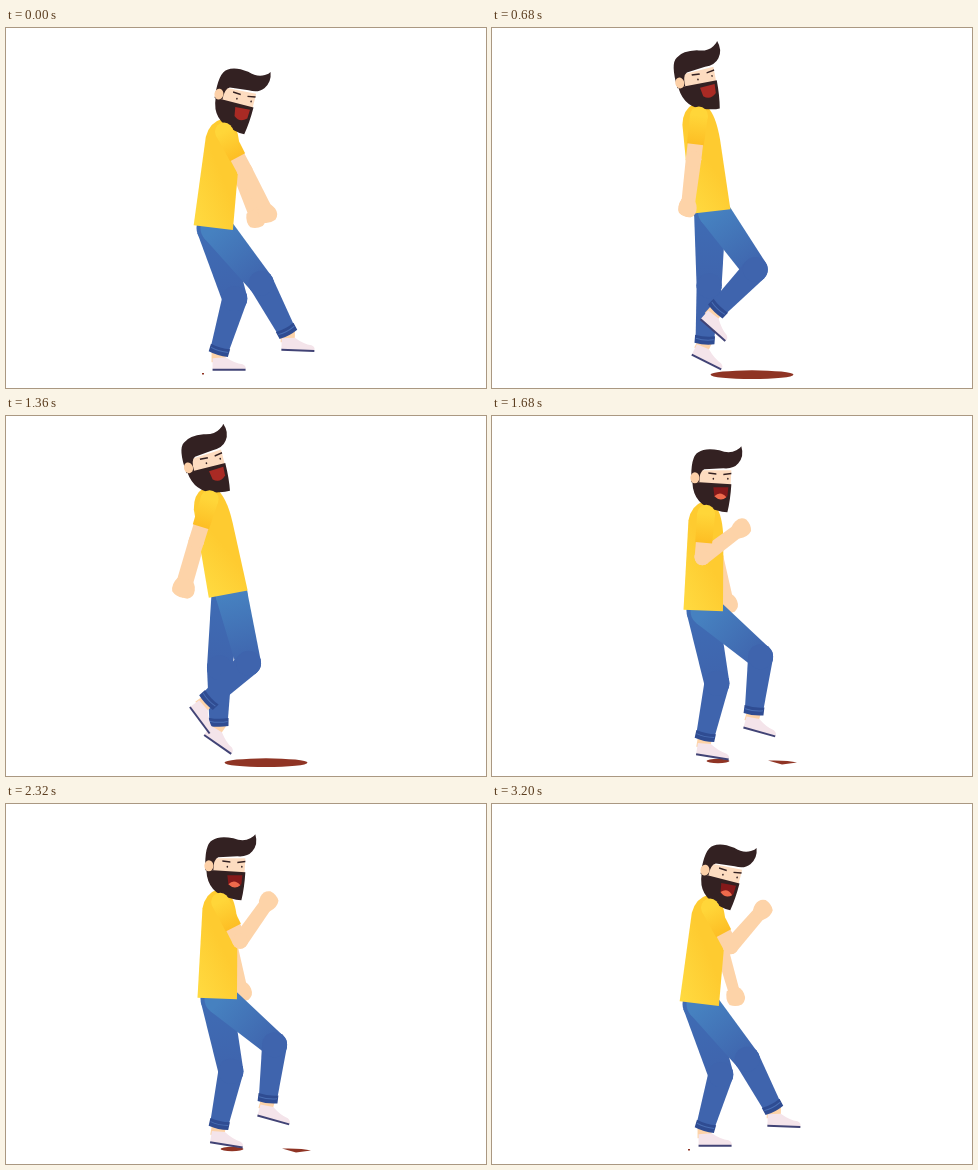
These frames come from a looping animation (480x360 px, 3.24 s). An HTML page with a canvas:

```html
<!DOCTYPE html>
<html lang="en">
<head>
<meta charset="utf-8">
<title>Dancing man</title>
<style>
html, body { margin: 0; width: 100%; height: 100%; overflow: hidden; background: #fff; }
canvas { display: block; width: 480px; height: 360px; }
</style>
</head>
<body>
<canvas id="stage" width="480" height="360"></canvas>
<script>
const ctx = document.getElementById('stage').getContext('2d');
const STEP = 40, STEPS = 81;
const SKIN = '#fdd3a8', HAIR = '#332122', JEANS = '#3f64ad', CUFF = '#2f4c92';

const rad = deg => deg * Math.PI / 180;
const mix = (a, b, u) => a + (b - a) * u;
const clamp = u => Math.max(0, Math.min(1, u));
const smooth = u => u * u * (3 - 2 * u);
const easeCubic = u => u < .5 ? 4 * u ** 3 : 1 - 4 * (1 - u) ** 3;

// Limb angles are measured from straight down, positive to the right.
const reach = (p, deg, len) => ({
  x: p.x + Math.sin(rad(deg)) * len,
  y: p.y + Math.cos(rad(deg)) * len
});

function shape(path, fill) {
  ctx.fillStyle = fill;
  ctx.fill(new Path2D(path));
}

function oval(x, y, rx, ry, fill) {
  ctx.fillStyle = fill;
  ctx.beginPath();
  ctx.ellipse(x, y, rx, ry, 0, 0, Math.PI * 2);
  ctx.fill();
}

function placed(p, deg, draw) {
  ctx.save();
  ctx.translate(p.x, p.y);
  ctx.rotate(rad(deg));
  draw();
  ctx.restore();
}

function blend(a, b, from, to) {
  const g = ctx.createLinearGradient(a.x, a.y, b.x, b.y);
  g.addColorStop(0, from);
  g.addColorStop(1, to);
  return g;
}

// Tapered bar between two joints; the end stays flat unless round is set.
function limb(a, b, wa, wb, fill, round = true) {
  const d = Math.atan2(b.y - a.y, b.x - a.x);
  const nx = -Math.sin(d) / 2, ny = Math.cos(d) / 2;
  ctx.fillStyle = fill;
  ctx.beginPath();
  ctx.moveTo(a.x + nx * wa, a.y + ny * wa);
  ctx.lineTo(b.x + nx * wb, b.y + ny * wb);
  ctx.lineTo(b.x - nx * wb, b.y - ny * wb);
  ctx.lineTo(a.x - nx * wa, a.y - ny * wa);
  ctx.fill();
  oval(a.x, a.y, wa / 2, wa / 2, fill);
  if (round) oval(b.x, b.y, wb / 2, wb / 2, fill);
}

function leg(hip, thigh, shin, foot, thighLen, topTone) {
  const knee = reach(hip, thigh, thighLen);
  const ankle = reach(knee, shin, 57);
  placed(ankle, foot, () => {
    shape('M-7-3H7V9H-7Z', SKIN);
    shape('M-6 5L7 4Q16 10 24 11Q28 13 27 16H-6Z', '#f4e4ea');
    shape('M-6 15.5H27V17.5H-6Z', '#414375');
  });
  limb(hip, knee, 32, 25, blend(hip, knee, topTone, JEANS));
  limb(knee, ankle, 25, 18, JEANS, false);
  placed(ankle, -shin, () => {
    shape('M-10-7Q0-5 10-7V1Q0 3-10 1Z', CUFF);
    shape('M-9-4Q0-2 9-4V-3Q0-1-9-3Z', '#4a6fb4');
  });
}

function arm(shoulder, upper, fore, width) {
  const elbow = reach(shoulder, upper, 44);
  const hand = reach(elbow, fore, 49);
  limb(shoulder, elbow, width, width, SKIN);
  limb(elbow, hand, width, width - 2, SKIN);
  placed(hand, -fore, () => shape('M-7-8Q-11 0-8 6Q-3 10 4 9Q10 6 9-1Q8-8 3-10Z', SKIN));
}

function sleeve(shoulder, upper) {
  const end = reach(shoulder, upper, 29);
  limb(shoulder, end, 18, 17, blend(shoulder, end, '#ffd639', '#fdbe24'), false);
}

function torso() {
  shape('M-20-.5L-17.5-90Q-15-105-4-109L9-105Q17-96 18-70L19.5 0Z',
    blend({ x: -18, y: 0 }, { x: 20, y: -20 }, '#ffda40', '#fecb30'));
}

function head(tongue) {
  shape('M-9-36H26L25-18H-9Z', '#fddcc0');
  shape('M-13-24Q-12-1 11 4Q17 6 22 6Q25-6 26-22L-6-24Z', HAIR);
  shape('M-14-24Q-15-50-7-54Q0-59 14-56Q24-52 31-56Q35-58 36-60Q39-50 33-43Q28-37 18-38L-1-37Q-6-35-6-24Z', HAIR);
  oval(-10.5, -28.5, 4.5, 5.5, '#fcd0a8');
  shape('M3-34L11-33V-31.5L3-32.5ZM18-32.5L26-33.5V-32L18-31Z', HAIR);
  oval(8, -27.5, .8, 1, HAIR);
  oval(22.5, -27.5, .8, 1, HAIR);
  shape('M8-19H23L22-10Q15-4 9-10Z', tongue ? '#85191a' : '#a92a24');
  if (tongue) shape('M9-10Q15-16 21-9Q15-4 9-10Z', '#ee6a4c');
}

function shadow(s) {
  const tone = '#8f3424';
  if (s > .5) oval(260, 346.7, 41.5, 4.4, tone);
  else if (s > .1) {
    oval(226, 345, 11.5, 2.2, tone);
    shape('M276 344.5Q296 344 305 346.5L290 348.5Z', tone);
  } else shape('M196 345H198V346.5H196Z', tone);
}

// Near arm: swing, bend back, then hold the fist up.
function nearArm(t, s) {
  const swing = 28 - 47 * s;
  const raised = [28 - 4 * s, 139 + 22 * s];
  if (t < 1400) return [swing, swing];
  if (t < 1680) {
    const u = smooth((t - 1400) / 280);
    return [mix(-19, -5, u), mix(-19, 127, u)];
  }
  const u = smooth(clamp((t - 1680) / 200));
  return [mix(-5, raised[0], u), mix(127, raised[1], u)];
}

function draw(t) {
  const beat = (t % 400) / 200;
  const s = easeCubic(beat <= 1 ? beat : 2 - beat);
  const late = smooth(clamp((t - 1400) / 200));

  const hip = { x: 207.5 + 15.5 * s, y: 200 - 20 * s - 2.5 * s * s };
  const lean = 6.2 - 18 * s;
  const shoulder = reach(hip, 180 - lean, 97);
  const neck = reach(hip, 180 - lean, 104.5);
  neck.x -= 1;
  const farAngle = mix(20 - 36 * s, 16 - 8 * s, late);
  const [upper, fore] = nearArm(t, s);

  ctx.clearRect(0, 0, 480, 360);
  shadow(s);
  arm(shoulder, farAngle, farAngle, 13);
  leg({ x: hip.x - 1, y: hip.y }, 17.5 - 24.5 * s, -16.5 + 16 * s, 36 * s, 74, '#3f6cb4');
  leg({ x: hip.x + 3, y: hip.y }, 39 + 66 * s - 95 * s * s, 28 - 158 * s + 83 * s * s,
    2 + 53 * s, 71, '#4681c0');
  placed(hip, lean, torso);
  placed(neck, 11 - 48 * s + 19 * s * s, () => head(t > 1400));
  arm(shoulder, upper, fore, 15.5);
  sleeve(shoulder, upper);
}

const start = performance.now();
function tick() {
  const step = Math.floor((performance.now() - start) / STEP) % STEPS;
  draw(step * STEP);
  requestAnimationFrame(tick);
}
tick();
</script>
</body>
</html>
```
